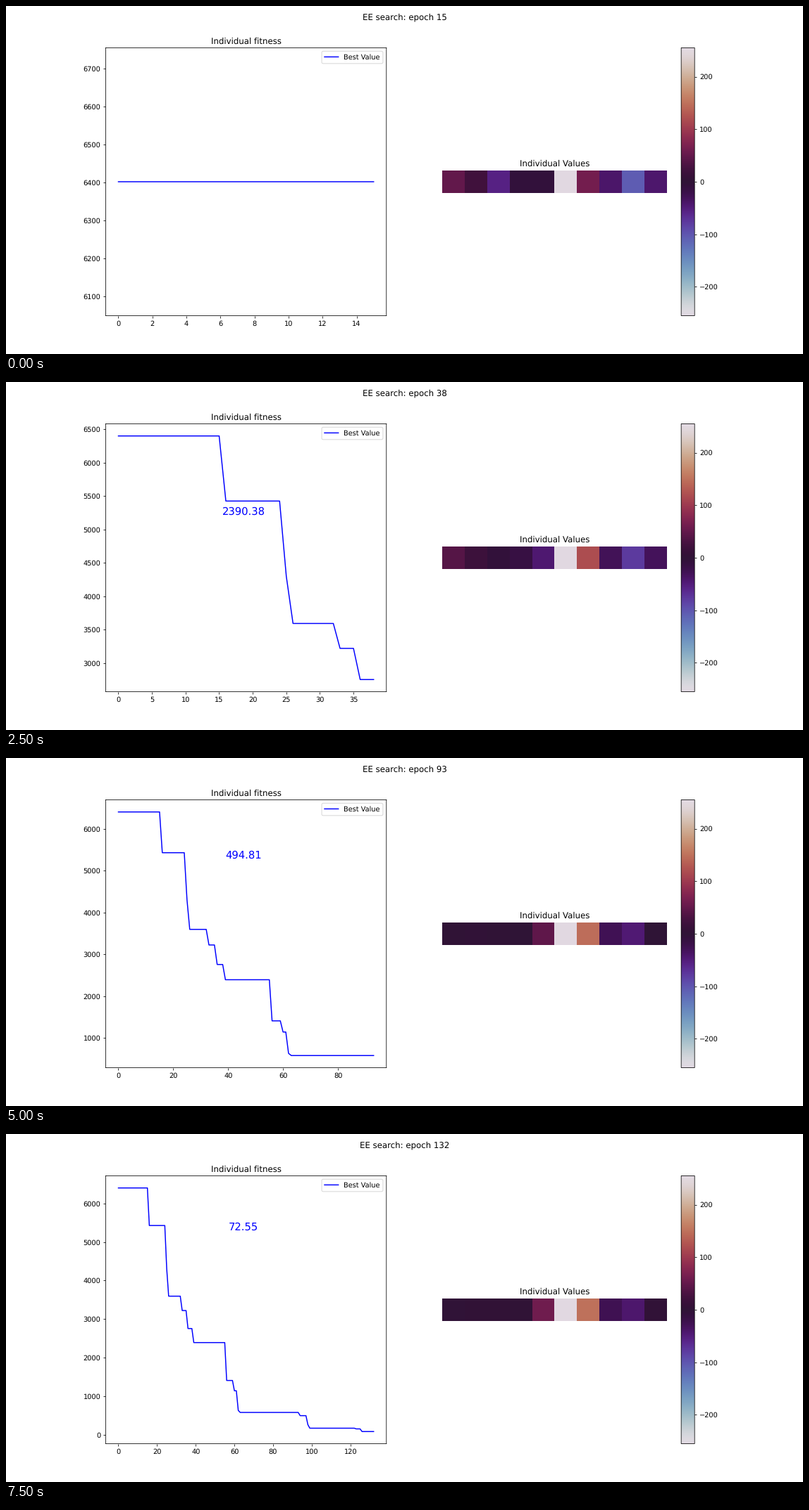
Write a matplotlib script that moves like this. It is 1131 by 495 pixels and loops after 8000 ms.

```python
import numpy as np
import matplotlib.pyplot as plt
from matplotlib.animation import FuncAnimation

W, H = 1131, 495
DPI = W / 16
LIMIT = 255

# soft edges and unhinted letters, as in a scaled-down 16 inch figure
plt.rcParams.update({"path.snap": False, "text.hinting": "none"})

# corners of the curve: epoch of each improvement -> new best fitness
BEST = {0: 6401.85, 16: 5427.18, 25: 4299.64, 26: 3594.37, 33: 3221.46,
        36: 2754.86, 39: 2390.38, 56: 1407.27, 60: 1140.63, 62: 630.51,
        63: 578.24, 94: 494.81, 98: 260.93, 99: 169.42, 123: 151.38,
        126: 82.64, 133: 72.55}
EPOCHS = np.array(list(BEST))
FITNESS = np.array(list(BEST.values()))
STEPS = len(BEST) - 1

# the ten genes at the start, halfway and when settled
START = np.array([50, 22, -56, -7, -7, 255, 63, -40, -106, -42])
MIDDLE = np.array([39, 18, 2, -15, -48, 255, 126, -27, -74, -29])
END = np.array([-2, 3, 3, 2, 60, 255, 150, -26, -42, 4])


def ease(step, first, last):
    t = np.clip((step - first) / (last - first), 0, 1)
    return t * t * (3 - 2 * t)


def genes(step):
    row = (START + (MIDDLE - START) * ease(step, 1, 6)
           + (END - MIDDLE) * ease(step, 6, 11))
    return row[None, :]


def fitness(epochs):
    return FITNESS[np.searchsorted(EPOCHS, epochs, side="right") - 1]


fig, (ax, strip) = plt.subplots(1, 2, figsize=(W / DPI, H / DPI), dpi=DPI)
title = fig.suptitle("")

ax.set_title("Individual fitness")
line, = ax.plot([], [], color="blue", label="Best Value")
ax.legend(loc="upper right")
note = ax.annotate("", (0, 0), xytext=(0, 10), textcoords="offset points",
                   ha="center", color="blue", fontsize=15)

strip.set_title("Individual Values")
strip.axis("off")
image = strip.imshow(genes(0), cmap="twilight", vmin=-LIMIT, vmax=LIMIT)
fig.colorbar(image, ax=strip)


def draw(step):
    # each picture is taken just before the next improvement is plotted
    last = EPOCHS[step + 1] - 1
    epochs = np.arange(last + 1)
    title.set_text(f"EE search: epoch {last}")
    line.set_data(epochs, fitness(epochs))
    ax.relim()
    ax.autoscale_view()
    note.xy = (0.49 * last, 0.8 * FITNESS[0])
    note.set_text(f"{FITNESS[step + 1]:.2f}")
    image.set_data(genes(step))
    return title, line, note, image


anim = FuncAnimation(fig, draw, frames=STEPS, interval=500,
                     init_func=lambda: draw(0), repeat=True, repeat_delay=0)
plt.show()
```
